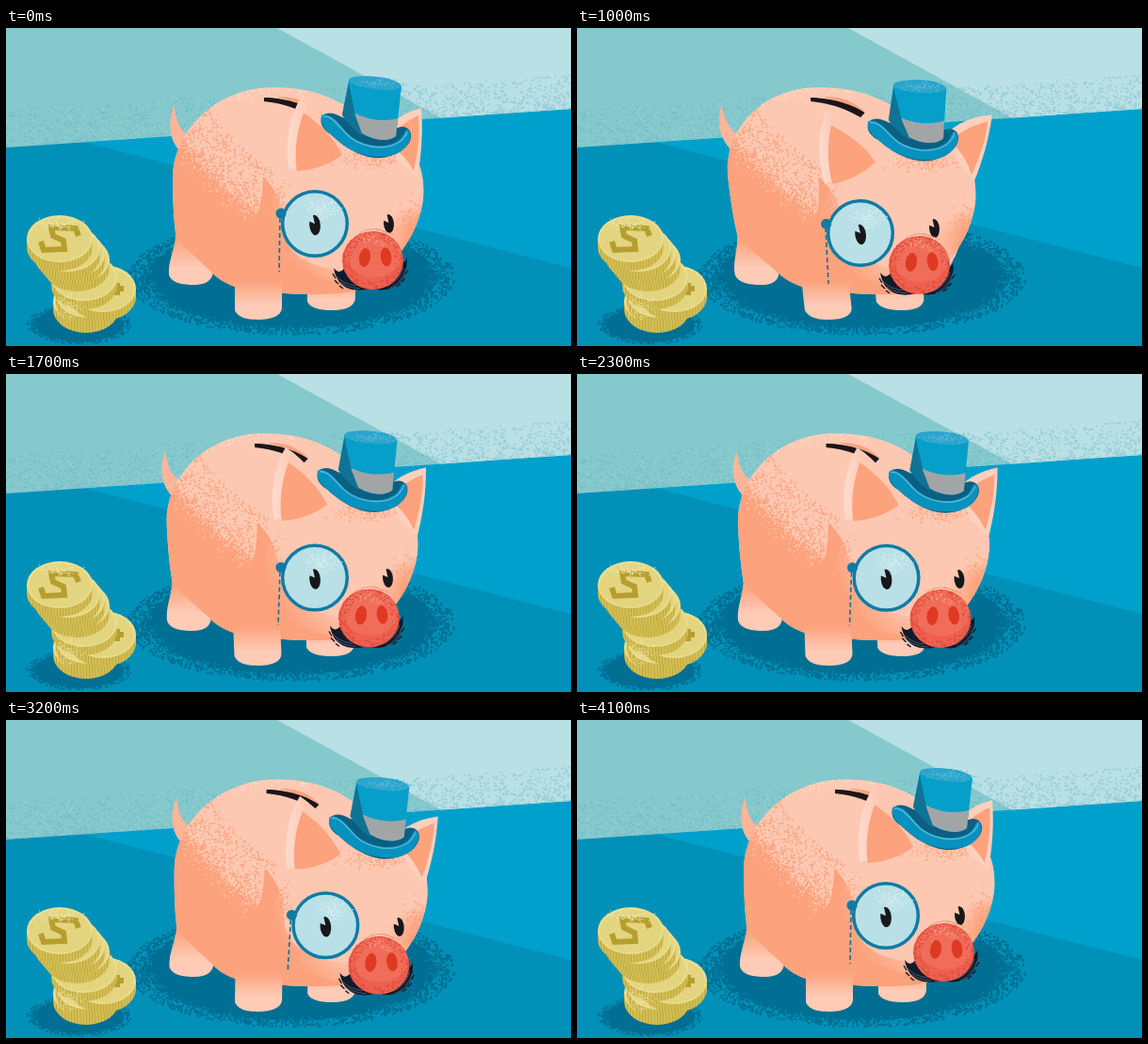
Write an HTML page that moves like this. It is 600 by 338 pixels and loops after 4.2 s.

```html
<!DOCTYPE html>
<html lang="en">
<head>
<meta charset="utf-8">
<title>Piggy bank</title>
<style>
html, body { margin: 0; width: 100%; height: 100%; overflow: hidden; background: #0090b8; }
svg { display: block; width: 100vw; height: 100vh; }
</style>
</head>
<body>
<svg id="stage" viewBox="0 0 600 338" preserveAspectRatio="none">
  <defs>
    <pattern id="ridges" width="3.2" height="20" patternUnits="userSpaceOnUse">
      <rect width="3.2" height="20" fill="#d5c054"/><rect width="1" height="20" fill="#bda63e"/>
    </pattern>
    <linearGradient id="foot" x2="0" y2="1">
      <stop offset=".2" stop-color="#fca27c"/><stop offset=".7" stop-color="#fdcbb6"/>
    </linearGradient>
    <linearGradient id="ear" x2="1" y2="0">
      <stop offset="0" stop-color="#fddccf"/><stop offset=".35" stop-color="#fdc8b2"/>
    </linearGradient>
    <radialGradient id="face" gradientUnits="userSpaceOnUse" cx="415" cy="160" r="142">
      <stop offset=".68" stop-color="#fdc8b2"/><stop offset="1" stop-color="#fdc8b2" stop-opacity="0"/>
    </radialGradient>
    <radialGradient id="cheek" gradientUnits="userSpaceOnUse" cx="440" cy="228" r="42">
      <stop offset=".3" stop-color="#fca27c"/><stop offset="1" stop-color="#fca27c" stop-opacity="0"/>
    </radialGradient>
    <clipPath id="wallLeft"><path d="M0 0H288L462 95.500L0 127Z"/></clipPath>
    <clipPath id="wallRight"><path d="M288 0H600V86L462 95.500Z"/></clipPath>
    <clipPath id="bodyClip"><use href="#bodyShape"/></clipPath>
    <clipPath id="headClip"><use href="#headShape"/></clipPath>
    <clipPath id="snoutClip"><ellipse cx="389.500" cy="247" rx="32.500" ry="31"/></clipPath>
    <clipPath id="aboveSlot"><path d="M200 -90H400V108L330 92C316 84 295 76 274 75.500L200 75Z"/></clipPath>
    <path id="bodyShape" d="M177 160C177 111 221 63 285 63C335 63 372 82 398 120L425 175C425 225 405 262 372 279C350 285 310 283 292 282L243 275C232 271 224 266 219 260L181 225C178 205 177 180 177 160Z"/>
    <path id="headShape" d="M300 150C312 112 375 96 420 118C440 134 446 160 443 184C439 212 421 242 400 258C385 270 350 275 325 262C290 250 278 225 280 195C282 175 292 162 300 150Z"/>
  </defs>

  <rect width="600" height="338" fill="#0090b8"/>
  <path d="M82 121L600 86V255Z" fill="#00a0cc"/>
  <path d="M0 0H600V86L0 127Z" fill="#85c9cd"/>
  <path d="M288 0H600V86L462 95.500Z" fill="#b9e0e5"/>
  <g id="leftDots" clip-path="url(#wallLeft)"></g>
  <g id="rightDots" clip-path="url(#wallRight)"></g>
  <g id="shadows">
    <ellipse cx="303" cy="265" rx="153" ry="54" fill="#006f93"/>
    <ellipse cx="78" cy="315" rx="47" ry="18" fill="#006f93"/>
  </g>
  <g id="coins"></g>

  <g id="body">
    <path d="M179 82C172 97 172 117 184 130L198 112C188 116 180 100 179 82Z" fill="#fbb599"/>
    <path d="M181 212C180 236 172 246 173 262C175 271 188 273 200 273C212 273 220 268 220 258L230 232Z" fill="url(#foot)"/>
    <path d="M320 262V291C324 299 336 300 348 300C362 300 371 295 371 286V260Z" fill="url(#foot)"/>
    <use href="#bodyShape" fill="#fdc8b2"/>
    <g id="bodyShade" clip-path="url(#bodyClip)">
      <path d="M160 80L176 105Q215 165 266 197Q272 190 273 158Q292 175 294 205C292 250 340 262 400 258V300H160Z" fill="#fca27c"/>
    </g>
    <path d="M243 258V300C247 309 258 310 268 310C282 310 292 306 293 298V258Z" fill="url(#foot)"/>
    <path d="M287 73C304 72 320 77 331 90C318 82 304 77 287 73Z" fill="#fca27c"/>
    <path d="M274 74C296 74 318 81 330 90L325 95C311 86 295 80 274 78Z" fill="#1c1518"/>
    <g clip-path="url(#aboveSlot)" id="drops"></g>
  </g>

  <g id="head"><g id="headShade" clip-path="url(#headClip)">
    <use href="#headShape" fill="url(#face)"/><use href="#headShape" fill="url(#cheek)"/>
  </g></g>
  <g id="earR">
    <path d="M441 85C426 89 411 97 402 109L416 142L437 158C441 135 443 112 441 85Z" fill="#fdd0bd"/>
    <path d="M438 93C424 99 411 110 404 122Q422 132 433 152C437 133 440 114 438 93Z" fill="#fca27c"/>
  </g>
  <g id="earL">
    <path d="M313 74C300 96 296 126 301 151L359 134C351 110 335 88 313 74Z" fill="url(#ear)"/>
    <path d="M316 90C308 111 306 135 309 152C328 151 346 144 357 135C348 116 332 101 316 90Z" fill="#fca27c"/>
  </g>
  <g id="hat">
    <path d="M336 93C342 88 350 91 357 95L416 106C424 103 431 108 430 116C428 130 408 139 392 138C370 136 352 120 345 113C336 108 332 100 336 93Z" fill="#0b5f82"/>
    <path d="M364 56C376 48 414 51 420 62L414 115C402 124 376 118 357 93Z" fill="#069fca"/>
    <path d="M357 92L359 82C372 96 398 101 416 96L414 115C402 124 376 118 357 92Z" fill="#a2a5a6"/>
    <path d="M364 58L357 92C363 102 370 109 379 115L371 93Z" fill="#0f7396"/>
    <ellipse cx="392" cy="58.500" rx="28" ry="6.500" transform="rotate(7 392 58)" fill="#2ba5cc"/>
    <path d="M335 93C343 89 352 99 360 109C372 124 400 131 416 120C423 116 422 108 427 108C433 116 426 127 418 132C402 141 375 137 358 124C347 114 332 106 335 93Z" fill="#0791bf"/>
    <path d="M337 94C345 93 352 102 360 111C373 126 401 132 418 121Q425 115 426 110" fill="none" stroke="#5abbd9" stroke-width="1.300"/>
  </g>

  <path id="chain" fill="none" stroke="#1c7394" stroke-width="1.700" stroke-dasharray="5 3"/>
  <g id="lens">
    <circle cx="328" cy="208" r="34.300" fill="#b9e0e6" stroke="#0f7ba5" stroke-width="3.500"/>
    <g id="glass"></g>
    <ellipse cx="328" cy="209.500" rx="5.800" ry="10.800" transform="rotate(-5 328 209)" fill="#171719"/>
    <path d="M328 208L325.500 197L318 204Z" fill="#b9e0e6"/>
    <circle cx="292" cy="197" r="5.500" fill="#0f7ba5"/>
  </g>
  <g id="eye">
    <ellipse cx="406.500" cy="208" rx="5.400" ry="10" transform="rotate(-5 406 208)" fill="#171719"/>
    <path d="M406.500 207L404 196L397 203Z" fill="#fdc8b2"/>
  </g>
  <g id="nose">
    <path d="M374 219Q389 209 405 218M393 213L412 220" fill="none" stroke="#ed9b82" stroke-width="1"/>
    <path d="M348 255C354 263 358 257 362 252L386 277C371 281 352 279 348 255ZM425 239C427 246 423 250 418 250L393 278C415 281 429 266 425 239Z" fill="#101a2c"/>
    <path d="M351 264Q358 272 372 274M355 270Q362 276 376 277M422 254Q419 268 404 275M425 256Q420 271 407 277" fill="none" stroke="#6c8190" stroke-width=".6"/>
    <path d="M350 266l-3 -5M353 272l-4 -4M358 277l-4 -3M424 262l3 -5M420 270l4 -4M415 275l4 -3" stroke="#101a2c" stroke-width="1.400"/>
    <g id="snout" clip-path="url(#snoutClip)">
      <ellipse cx="389.500" cy="247" rx="32.500" ry="31" fill="#ee6150"/>
      <ellipse cx="391" cy="241" rx="29" ry="24" fill="#f06d59"/>
    </g>
    <ellipse cx="381" cy="244" rx="6" ry="10" transform="rotate(8 381 244)" fill="#de3a22"/>
    <ellipse cx="403.500" cy="243.500" rx="5.800" ry="10" transform="rotate(-8 403 243)" fill="#de3a22"/>
  </g>
</svg>
<script>
const $ = id => document.getElementById(id);
const LOOP = 4200, STEP = 100;

let seed = 11;
function rnd() {
  seed = (seed + 0x6d2b79f5) | 0;
  let v = Math.imul(seed ^ (seed >>> 15), 1 | seed);
  v = (v + Math.imul(v ^ (v >>> 7), 61 | v)) ^ v;
  return ((v ^ (v >>> 14)) >>> 0) / 4294967296;
}
const range = (a, b) => a + (b - a) * rnd();
const bell = () => rnd() + rnd() + rnd() - 1.5;

function add(parent, markup) {
  parent.insertAdjacentHTML('beforeend', markup);
  return parent.lastElementChild;
}

// Stipple: many round specks as one path
function specks(id, count, color, size, place) {
  let d = '';
  for (let i = 0; i < count; i++) {
    const [x, y] = place();
    d += `M${x.toFixed(1)} ${y.toFixed(1)}h.01`;
  }
  add($(id), `<path d="${d}" fill="none" stroke="${color}" stroke-width="${size}" stroke-linecap="round"/>`);
}
const rim = (cx, cy, rx, ry, from, to) => () => {
  const a = range(0, Math.PI * 2), k = from + (to - from) * rnd() ** 1.5;
  return [cx + Math.cos(a) * rx * k, cy + Math.sin(a) * ry * k];
};
const cloud = (x, y, w, h) => () => [x + bell() * w, y + bell() * h];
const along = (x0, y0, x1, y1, x2, y2, from, to) => () => {
  const t = rnd(), u = 1 - t, k = from + (to - from) * rnd() ** 2;
  return [u * u * x0 + 2 * u * t * x1 + t * t * x2 + k * .55,
          u * u * y0 + 2 * u * t * y1 + t * t * y2 - k];
};
const aboveFloor = (x0, x1, depth) => () => {
  const x = range(x0, x1);
  return [x, 127 - x * 41 / 600 - depth * rnd() ** 1.5];
};

specks('leftDots', 1050, '#78bfc8', 2.2, aboveFloor(0, 460, 40));
specks('leftDots', 260, '#9bd1d4', 1.8, aboveFloor(0, 460, 40));
specks('rightDots', 620, '#98ced7', 2.1, aboveFloor(400, 600, 36));

specks('shadows', 1700, '#006f93', 2.5, rim(303, 265, 153, 54, .97, 1.14));
specks('shadows', 200, '#0090b8', 1.7, rim(303, 265, 153, 54, 1.03, .95));
specks('shadows', 420, '#006f93', 2.1, rim(78, 315, 47, 18, .96, 1.18));

specks('bodyShade', 800, '#fca27c', 1.8, along(176, 105, 215, 165, 266, 197, 0, 42));
specks('bodyShade', 170, '#fdc8b2', 1.5, along(176, 105, 215, 165, 266, 197, 0, -14));
specks('bodyShade', 110, '#fee0d3', 1.5, along(205, 84, 250, 58, 320, 70, 2, -10));

specks('headShade', 170, '#fca27c', 1.6, cloud(284, 184, 14, 28));
specks('headShade', 200, '#fca27c', 1.5, cloud(392, 139, 36, 9));
specks('headShade', 260, '#fca27c', 1.6, cloud(434, 212, 16, 26));
specks('hat', 90, '#5bb9d6', 1.3, cloud(394, 59, 24, 5));
specks('glass', 150, '#d8eff1', 1.3, cloud(335, 192, 16, 10));
specks('snout', 330, '#de4a38', 1.5, rim(389.5, 247, 32.5, 31, 1, .72));
specks('snout', 60, '#f79a86', 1.3, cloud(392, 225, 18, 7));

const MARKS = {
  full: 'M20 -3L17 -11L-9 -12L-7 -3L4 2L5 11L-17 12L-20 3',
  end: 'M8 0H22M15 -6V7'
};
function coin(x, y, mark) {
  const g = add($('coins'), `<g transform="translate(${x} ${y})"></g>`);
  add(g, '<path d="M-35 0V9A35 25 0 0 0 35 9V0Z" fill="url(#ridges)"/>');
  add(g, '<ellipse rx="35" ry="25" fill="#eadd92"/>');
  add(g, '<ellipse rx="33" ry="23" cy=".500" fill="#e3d57f"/>');
  if (mark) add(g, `<path d="${MARKS[mark]}" fill="none" stroke="#b69e2f" stroke-width="6"/>`);
}
coin(85, 290); coin(88, 283); coin(103, 277, 'end'); coin(83, 265, 'end');
coin(75, 246); coin(70, 240); coin(65, 234); coin(57, 224, 'full');
specks('coins', 110, '#f0e7b0', 1.2, cloud(55, 209, 24, 6));
specks('coins', 90, '#f0e7b0', 1.2, cloud(68, 297, 13, 15));

const drops = [1700, 2300].map(start => ({
  start,
  el: add($('drops'), '<g><ellipse cx="3" cy="1" rx="22" ry="25" fill="#b3a03a"/><ellipse rx="22" ry="25" fill="#e3d57f" stroke="#c7b654"/><path d="M9 -8H-7V0H8V9H-9M0 -8V-14M0 9V15" fill="none" stroke="#b69e2f" stroke-width="4.500"/></g>')
}));

// Poses: offsets from rest at each inner time
const TIMES = [0, 600, 1000, 1700, 2900, 3600, 4100];
const poses = {
  body: [[-19, 4], [-26, 0], [-10, 0], [-9, 0], [20, 0]],
  head: [[-13, 12], [-20, 4], [-6, 8], [-5, 9], [18, 9]],
  earL: [[-18, 17, -2], [-39, 11, -8], [-16, 4, 0], [-15, 5, 0], [18, 10, 2]],
  earR: [[-14, 14, 7], [-15, 5, 12], [0, 14, 4], [1, 14, 4], [18, 20, 14]],
  hat: [[-14, 18, -1], [-26, 4, -3], [-4, 9, -1], [-3, 10, -1], [26, 9, 0]],
  lens: [[-15, 18], [-27, 10, -2], [0, 8.5], [1, 9.5], [27, 11]],
  chain: [[-14, 18], [-23, 13], [-1, 8], [0, 9], [23, 9]],
  eye: [[-15, 16], [-27, 5], [-1, 9], [0, 11], [27, 13]],
  nose: [[-16.5, 15.5], [-26, 5], [-4, 12.5], [-3, 13.5], [20.5, 14]]
};
const pivots = { earL: [330, 142], earR: [437, 157], hat: [385, 95], lens: [328, 208] };

// Monotone cubic through the key values
function curve(vals) {
  const n = TIMES.length;
  const rise = i => (vals[i + 1] - vals[i]) / (TIMES[i + 1] - TIMES[i]);
  const slope = vals.map((_, i) => {
    if (!i || i === n - 1) return 0;
    const a = rise(i - 1), b = rise(i);
    return a * b > 0 ? 2 * a * b / (a + b) : 0;
  });
  return t => {
    if (t >= TIMES[n - 1]) return vals[n - 1];
    let i = 0;
    while (t >= TIMES[i + 1]) i++;
    const h = TIMES[i + 1] - TIMES[i], u = (t - TIMES[i]) / h, v = 1 - u;
    return vals[i] * v * v * (1 + 2 * u) + vals[i + 1] * u * u * (3 - 2 * u)
      + h * u * v * (slope[i] * v - slope[i + 1] * u);
  };
}
const tracks = {};
for (const name in poses) {
  tracks[name] = [0, 1, 2].map(k => curve([0, ...poses[name].map(p => p[k] || 0), 0]));
}
const pose = (name, t) => tracks[name].map(f => f(t));

function draw(t) {
  // The body leans over its planted feet
  const [lean, sink] = pose('body', t), k = lean / 235, q = sink / 235;
  $('body').setAttribute('transform', `matrix(1 0 ${-k} ${1 - q} ${310 * k} ${310 * q})`);

  for (const name of ['head', 'earL', 'earR', 'hat', 'lens', 'eye', 'nose']) {
    const [x, y, r] = pose(name, t), [px, py] = pivots[name] || [0, 0];
    $(name).setAttribute('transform', `translate(${x} ${y}) rotate(${r} ${px} ${py})`);
  }
  const [kx, ky] = pose('lens', t), [ex, ey] = pose('chain', t);
  $('chain').setAttribute('d', `M${291 + kx} ${202 + ky}L${290 + ex} ${259 + ey}`);

  for (const { start, el } of drops) {
    const u = (t - start) / 450;
    el.setAttribute('visibility', u > 0 && u < 1 ? 'visible' : 'hidden');
    el.setAttribute('transform', `translate(301 ${-30 + 150 * u * u}) skewY(14)`);
  }
}

const begin = performance.now();
function tick() {
  const t = (performance.now() - begin) % LOOP;
  draw(Math.floor(t / STEP) * STEP);
  requestAnimationFrame(tick);
}
draw(0);
requestAnimationFrame(tick);
</script>
</body>
</html>
```
